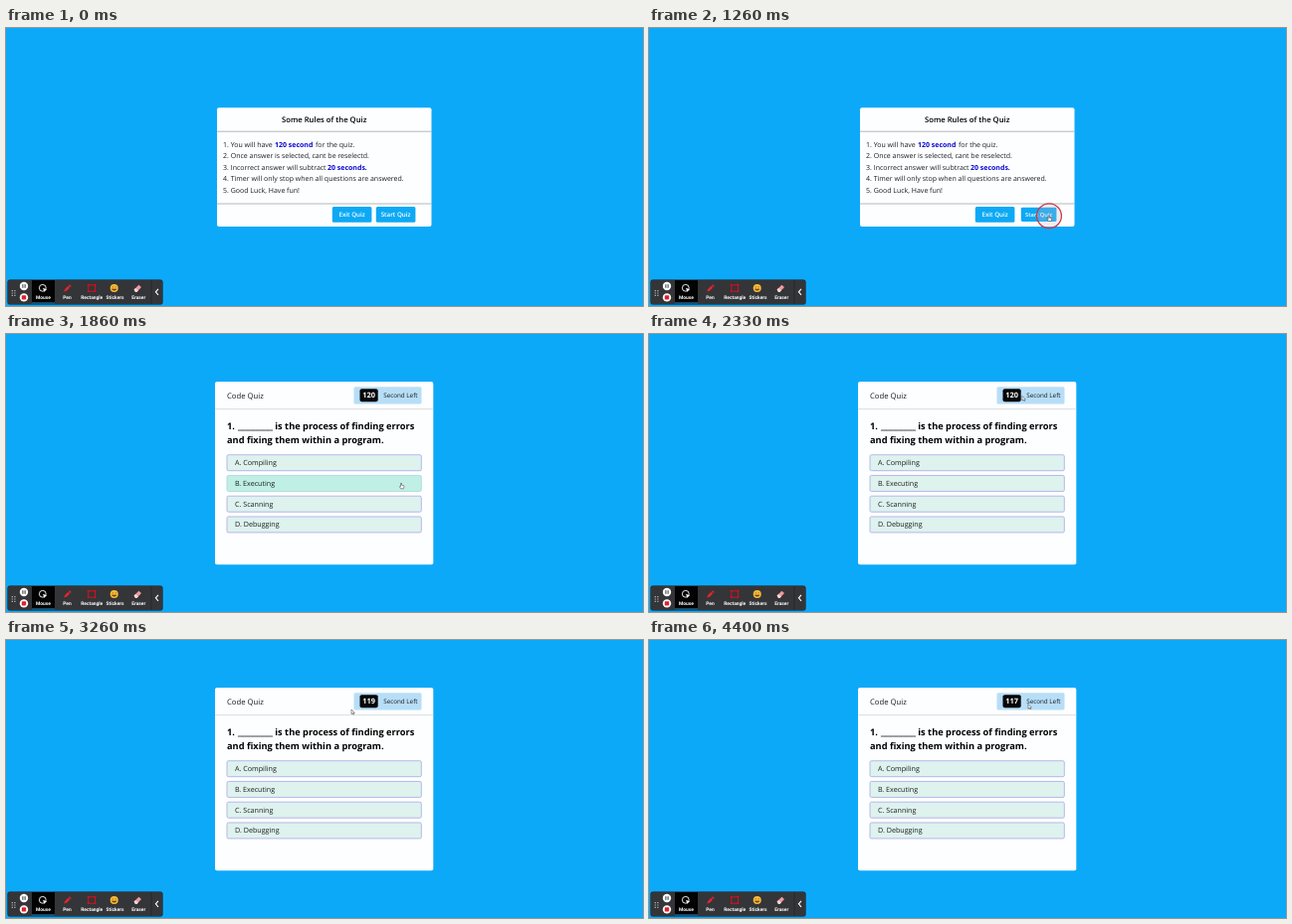
Recreate the animation shown at these times as an HTML page. Size 640x280 px, loop 4730 ms.

```html
<!DOCTYPE html>
<html lang="en">
<head>
<meta charset="utf-8">
<title>Code Quiz</title>
<style>
  html, body { margin: 0; height: 100%; overflow: hidden; background: #0da9f9; }
  svg { display: block; width: 100vw; height: 100vh; }
  text { font-family: "Open Sans", sans-serif; font-size: 7px; fill: #1c1c1e; text-rendering: geometricPrecision; }
  .mid { text-anchor: middle; }
  .blue { font-weight: 700; fill: #0a08d0; }
  .title { font-size: 7.7px; font-weight: 600; fill: #000; }
  .question { font-size: 9.25px; font-weight: 700; fill: #000; }
  .blank { font-family: "DejaVu Sans", sans-serif; font-size: 10px; fill: #000; }
  .button rect { fill: #0da9f5; }
  .button text { font-size: 6.25px; font-weight: 600; fill: #fff; }
  .option rect { fill: #def2ee; stroke: #a9a8e6; stroke-width: .8; }
  .option.hover rect { fill: #c0f0e5; stroke: #a6d8d6; }
  .option text { font-size: 7.15px; }
  #tools text { font: 700 4.9px Roboto, sans-serif; fill: #fff; }
</style>
</head>
<body>
<svg viewBox="0 0 640 280" preserveAspectRatio="none">
  <rect width="640" height="280" fill="#0da9f9"/>

  <g id="rules">
    <rect x="212" y="80.3" width="215.5" height="119.7" rx="2" fill="#fdfeff"/>
    <path d="M212 104.2H427.5M212 177H427.5" stroke="#a3a6a9" stroke-width=".8"/>
    <text class="title mid" x="319.7" y="94.6">Some Rules of the Quiz</text>
    <text x="218" y="119.5">1. You will have</text>
    <text class="blue" x="270" y="119.5">120 second</text>
    <text x="311" y="119.5">for the quiz.</text>
    <text x="218" y="131">2. Once answer is selected, cant be reselectd.</text>
    <text x="218" y="142.6">3. Incorrect answer will subtract</text>
    <text class="blue" x="323" y="142.6">20 seconds.</text>
    <text x="218" y="154.2">4. Timer will only stop when all questions are answered.</text>
    <text x="218" y="165.7">5. Good Luck, Have fun!</text>
    <g class="button">
      <rect x="327.8" y="180" width="39.6" height="15.7" rx="1.5"/>
      <text class="mid" x="347.6" y="190.2">Exit Quiz</text>
    </g>
    <g class="button" id="start">
      <rect x="371.8" y="180" width="39.6" height="15.7" rx="1.5"/>
      <text class="mid" x="391.6" y="190.2">Start Quiz</text>
    </g>
  </g>

  <g id="quiz">
    <rect x="210" y="48" width="219.3" height="184.3" rx="2" fill="#fdfeff"/>
    <path d="M210 75.6H429.3" stroke="#d3d6d9" stroke-width=".8"/>
    <text x="222" y="64.7" style="font-size:7.7px">Code Quiz</text>
    <rect x="349.5" y="53.3" width="68" height="17.2" rx="1.5" fill="#b7def7"/>
    <rect x="355.5" y="55.2" width="18.2" height="13" rx="2" fill="#050608"/>
    <text id="timer" class="mid" x="364.6" y="64.4" style="font-size:7.4px;font-weight:700;fill:#fff">120</text>
    <text x="379.2" y="64" style="font-size:6.3px">Second Left</text>
    <text class="question" x="222" y="96.3">1.</text>
    <text class="blank" x="233" y="95">_______</text>
    <text class="question" x="270.3" y="96.3">is the process of finding errors</text>
    <text class="question" x="222" y="109.8">and fixing them within a program.</text>
    <g id="options"></g>
  </g>

  <g id="tools">
    <rect x="1.5" y="253.6" width="156" height="25" rx="2.5" fill="#343539" stroke="#000" stroke-opacity=".2"/>
    <path d="M26 254H49V277.6H26Z" fill="#030304"/>
    <path d="M26 277H49" stroke="#1a8fd0"/>
    <path d="M146 254V278" stroke="#242529" stroke-width=".8"/>
    <path d="M6.3 264v6M8.9 264v6" stroke="#b9babd" stroke-width="1.2" stroke-dasharray="1.2 1.2"/>
    <circle cx="18" cy="260" r="4.2" fill="#fff"/>
    <path d="M16.9 258.2v3.6M19.1 258.2v3.6" stroke="#333"/>
    <circle cx="18" cy="271.4" r="4.2" fill="#fff"/>
    <rect x="15.8" y="269.2" width="4.4" height="4.4" rx=".8" fill="#e0202c"/>
    <circle cx="36.8" cy="261.8" r="3.4" fill="none" stroke="#fff" stroke-width=".9"/>
    <path d="M37 261.8l4.2 1.7-1.8.8-.8 1.8z" fill="#fff"/>
    <path d="M58.2 265.6l1-2.6 3.2-3.2 1.7 1.7-3.2 3.2zM62.9 259.2l1-1 1.8 1.8-1 1z" fill="#e8242f"/>
    <rect x="82.7" y="258.8" width="6.8" height="6.4" fill="none" stroke="#d3101d"/>
    <path d="M81.8 258.8h1.8M88.6 258.8h1.8M81.8 265.2h1.8M88.6 265.2h1.8" stroke="#d3101d" stroke-width="1.8"/>
    <circle cx="108.7" cy="262" r="4" fill="#f6bd35"/>
    <path d="M106.7 260.8h1.3M109.5 260.8h1.3M106.4 263q2.3 2.6 4.6 0z" fill="#7a3b12" stroke="#7a3b12" stroke-width=".6"/>
    <path d="M128.6 263.6l4.8-4.8 2.6 2.3-4.6 4.8h-1.4z" fill="#f09a9d"/>
    <path d="M128.6 263.6l1.6-1.6 2.7 2.4-1.5 1.5h-1.4z" fill="#f4d9d8"/>
    <text class="mid" x="37.5" y="272.7">Mouse</text>
    <text class="mid" x="61.5" y="272.7">Pen</text>
    <text class="mid" x="86.2" y="272.7">Rectangle</text>
    <text class="mid" x="109.6" y="272.7">Stickers</text>
    <text class="mid" x="133.3" y="272.7">Eraser</text>
    <path d="M153 262.8l-2.6 3 2.6 3" fill="none" stroke="#fff" stroke-width="1.1"/>
  </g>

  <circle id="ring" cx="402" cy="189.2" fill="#cfb9c2" fill-opacity=".25" stroke="#c93a48" stroke-width="1.3"/>
  <g id="cursor" fill="#fff" stroke="#333" stroke-width=".5" stroke-linejoin="round">
    <path id="arrow" d="M0 0V4.6L1.1 3.6 1.9 5.2 2.6 4.9 1.9 3.4H3.3Z"/>
    <path id="hand" d="M-.5 .3q.5-.6 1 0V2.2L2.6 2.7Q3.1 3 2.9 4L2.4 5.8H-.2L-1.7 3.8Q-1.6 3-.5 3.6Z"/>
  </g>
</svg>
<script>
const $ = id => document.getElementById(id);
const show = (id, on) => $(id).style.display = on ? "" : "none";

const LOOP = 4730, TICK = 200 / 3;
const CLICK = 19, OPEN = 21;

// Cursor tip: [tick, x, y]
const route = [
  [1, 424, 214], [7, 417.8, 195.6], [9, 415, 195], [12, 401.7, 188.8],
  [26, 401.7, 188.8], [28, 397, 150], [30, 384, 82], [31, 379, 67],
  [34, 379, 67], [35, 375, 62.5], [42, 358, 64], [49, 347, 70],
  [51, 349, 69], [58, 381, 64.6]
];

const labels = ["A. Compiling", "B. Executing", "C. Scanning", "D. Debugging"];
const rowY = i => 121.7 + i * 20.75;
$("options").innerHTML = labels.map((label, i) => `<g class="option">
  <rect x="222" y="${rowY(i)}" width="195.3" height="16" rx="1.5"/>
  <text x="230" y="${rowY(i) + 10.5}">${label}</text></g>`).join("");
const rows = [...document.querySelectorAll(".option")];

function cursorAt(k) {
  const i = route.findIndex(p => p[0] >= k);
  if (i < 0) return route[route.length - 1].slice(1);
  if (i === 0) return route[0].slice(1);
  const [k0, x0, y0] = route[i - 1], [k1, x1, y1] = route[i];
  const u = (k - k0) / (k1 - k0);
  return [x0 + (x1 - x0) * u, y0 + (y1 - y0) * u];
}

function draw(ms) {
  const k = Math.floor((ms % LOOP + 7) / TICK);
  const [x, y] = cursorAt(k);
  const playing = k >= OPEN, pressed = k >= CLICK && !playing;

  show("rules", !playing);
  show("quiz", playing);
  $("start").setAttribute("transform",
    pressed ? "translate(391.6 187.9) scale(.9) translate(-391.6 -187.9)" : "");
  $("timer").textContent = 120 - Math.max(0, Math.floor((k - OPEN) / 15));

  let over = !playing && x > 372 && x < 411 && y > 180 && y < 196;
  rows.forEach((row, i) => {
    const hit = playing && y >= rowY(i) && y <= rowY(i) + 16;
    row.classList.toggle("hover", hit);
    over = over || hit;
  });

  show("cursor", k >= 1);
  show("hand", over);
  show("arrow", !over);
  $("cursor").setAttribute("transform", `translate(${x} ${y})`);

  show("ring", k >= CLICK && k <= OPEN);
  $("ring").setAttribute("r", playing ? 8.6 : 12.4);
}

function frame() {
  draw(performance.now());
  requestAnimationFrame(frame);
}
frame();
</script>
</body>
</html>
```
